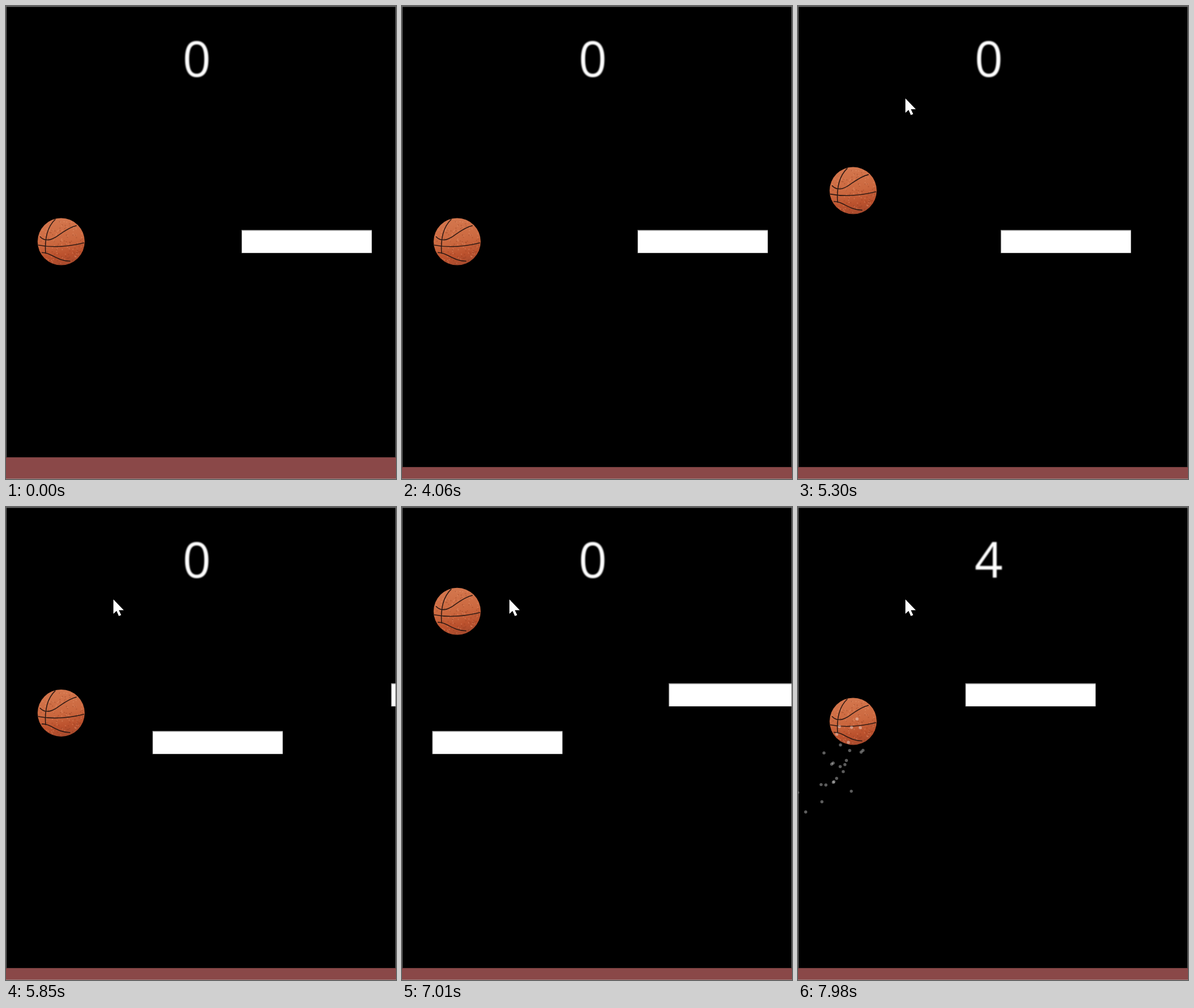
These frames come from a looping animation (679 px wide and 824 px high, 8000 ms). An HTML page with a canvas:

```html
<!DOCTYPE html>
<html lang="en">
<head>
<meta charset="utf-8">
<title>Bouncing ball game</title>
<style>
  html, body { margin: 0; width: 100%; height: 100%; overflow: hidden; background: #000; }
  canvas { display: block; }
</style>
</head>
<body>
<canvas id="stage" width="679" height="824"></canvas>
<script>
const ctx = document.getElementById('stage').getContext('2d');
const LOOP = 8000, W = 679, H = 824;
const BALL_X = 96, BALL_Y = 410.5, RADIUS = 41;
const LIFT = 0.747, GRAVITY = 0.002906;      // px per ms, px per ms²
const SPEED = 0.176;                         // scroll, px per ms
const BEGIN = 4963, HIT = 7267, BREAK = 7300;

const clamp = (v, lo, hi) => Math.min(hi, Math.max(lo, v));
const lerp = (a, b, k) => a + (b - a) * k;

function makeRandom(seed) {
  return () => (seed = (seed * 16807) % 2147483647) / 2147483647;
}

// The screen refreshes in bursts: [start, step]
const bursts = [[5010, 70], [5850, 82.5], [6720, 72], [7590, 78]];

function refreshTime(t) {
  const burst = bursts.filter(b => b[0] <= t).pop();
  if (!burst) return 0;
  const [from, step] = burst;
  return from + Math.floor((t - from) / step) * step;
}

// Every tap gives the ball the same upward speed
const taps = [BEGIN, 5523, 6008, 6256, 6653, 7442, 7760, 7940];

function ballY(t) {
  let y = BALL_Y;
  taps.forEach((tap, i) => {
    const d = clamp(t, tap, taps[i + 1] || LOOP) - tap;
    y += GRAVITY / 2 * d * d - LIFT * d;
  });
  return y;
}

// Dust is left behind at even distances along the ball's path
function makeDust() {
  const rnd = makeRandom(90210), list = [];
  const spread = size => (rnd() - 0.5) * size;
  let run = 0;
  for (let t = HIT; t < LOOP; t++) {
    run += Math.abs(ballY(t) - ballY(t - 1));
    if (run < 5.5) continue;
    run -= 5.5;
    list.push({ t, x: BALL_X + spread(72), y: ballY(t) + spread(26) });
  }
  return list;
}
const dust = makeDust();

function drawDust(t) {
  ctx.fillStyle = 'rgba(255, 255, 255, 0.36)';
  for (const d of dust) {
    const age = t - d.t;
    if (age < 0 || age > 460) continue;
    ctx.beginPath();
    ctx.arc(d.x - age * SPEED, d.y, 2.7, 0, 7);
    ctx.fill();
  }
}

const skin = ctx.createLinearGradient(-8, -RADIUS, 8, RADIUS);
skin.addColorStop(0, '#d4774e');
skin.addColorStop(0.5, '#cb683f');
skin.addColorStop(0.78, '#bb512d');
skin.addColorStop(1, '#a64a2d');
const seams = new Path2D(
  'M-37-9C-29 0-20-2-11-7S10-24 27-28' +
  'M-40 6Q-4 13 40 2' +
  'M-10-39C-24-26-29-5-27 21' +
  'M-34 19C-18 18-8 34 16 34');

function drawGrain() {
  const rnd = makeRandom(77);
  for (let i = 0; i < 160; i++) {
    const a = rnd() * 7, r = Math.sqrt(rnd()) * (RADIUS - 2);
    ctx.fillStyle = i % 2 ? 'rgba(240, 165, 125, 0.3)' : 'rgba(125, 50, 25, 0.25)';
    ctx.fillRect(r * Math.cos(a), r * Math.sin(a), 2, 2);
  }
}

function drawBall(y) {
  ctx.save();
  ctx.translate(BALL_X, y);
  ctx.beginPath();
  ctx.arc(0, 0, RADIUS, 0, 7);
  ctx.fillStyle = skin;
  ctx.fill();
  drawGrain();
  ctx.strokeStyle = '#2f1a14';
  ctx.lineWidth = 1.6;
  ctx.stroke(seams);
  ctx.restore();
}

function drawPlatform(x, y) {
  ctx.fillStyle = '#8a8a8a';
  ctx.fillRect(x, y - 1, 227, 40.5);
  ctx.fillStyle = '#fff';
  ctx.fillRect(x + 1, y + 0.5, 225.5, 38.5);
}

function drawPlatforms(t) {
  if (t < BREAK) drawPlatform(410 - Math.max(0, t - BEGIN) * 0.1748, 391);
  const x = 553 - (t - 6510) * 0.178;
  if (x < W) drawPlatform(x, 308);
}

function drawScore(text) {
  ctx.save();
  ctx.filter = 'blur(0.8px)';
  ctx.font = '86px "Open Sans", sans-serif';
  ctx.textAlign = 'center';
  ctx.fillStyle = '#fff';
  ctx.fillText(text, 332, 122.5);
  ctx.restore();
}

const arrow = new Path2D('M0 0V25L5.5 20 9.5 29 13.5 27.3 9.5 18.8H18Z');

// A short first visit, then a slide in two strokes of two steps each
function pointerAt(t) {
  if (t >= 4270) {
    const first = clamp(Math.floor((t - 4270) / 60), 0, 2);
    const second = clamp(Math.floor((t - 4580) / 90), 0, 2);
    const k = (first + second) / 4;
    return [lerp(142, 187, k), lerp(64, 161, k)];
  }
  if (t < 800 || t >= 1160) return null;
  return t < 1070 ? [532, t < 860 ? 797 : 780] : [398, 390];
}

function drawPointer(t) {
  const place = pointerAt(t);
  if (!place) return;
  ctx.save();
  ctx.translate(...place);
  ctx.strokeStyle = '#000';
  ctx.lineWidth = 2;
  ctx.stroke(arrow);
  ctx.fillStyle = '#fff';
  ctx.fill(arrow);
  ctx.restore();
}

function drawGround(top) {
  ctx.fillStyle = '#6a3a3a';
  ctx.fillRect(0, top, W, 1);
  ctx.fillStyle = '#8a4848';
  ctx.fillRect(0, top + 1, W, H - top);
  ctx.fillStyle = '#a07c7c';
  ctx.fillRect(0, H - 1, W, 1);
}

function drawBorder() {
  ctx.fillStyle = '#6e6e6e';
  ctx.fillRect(0, 0, W, 1.5);
  ctx.fillRect(0, 0, 1, H);
  ctx.fillRect(W - 1, 0, 1, H);
}

function draw(time) {
  const t = refreshTime(time);
  ctx.fillStyle = '#000';
  ctx.fillRect(0, 0, W, H);
  drawPlatforms(t);
  drawBall(ballY(t));
  drawDust(t);
  drawScore(t < BREAK ? '0' : '4');
  drawBorder();
  drawGround(time < 4060 ? 786 : 803);
  drawPointer(time);
}

const start = performance.now();
function loop() {
  draw((performance.now() - start) % LOOP);
  requestAnimationFrame(loop);
}
loop();
</script>
</body>
</html>
```
